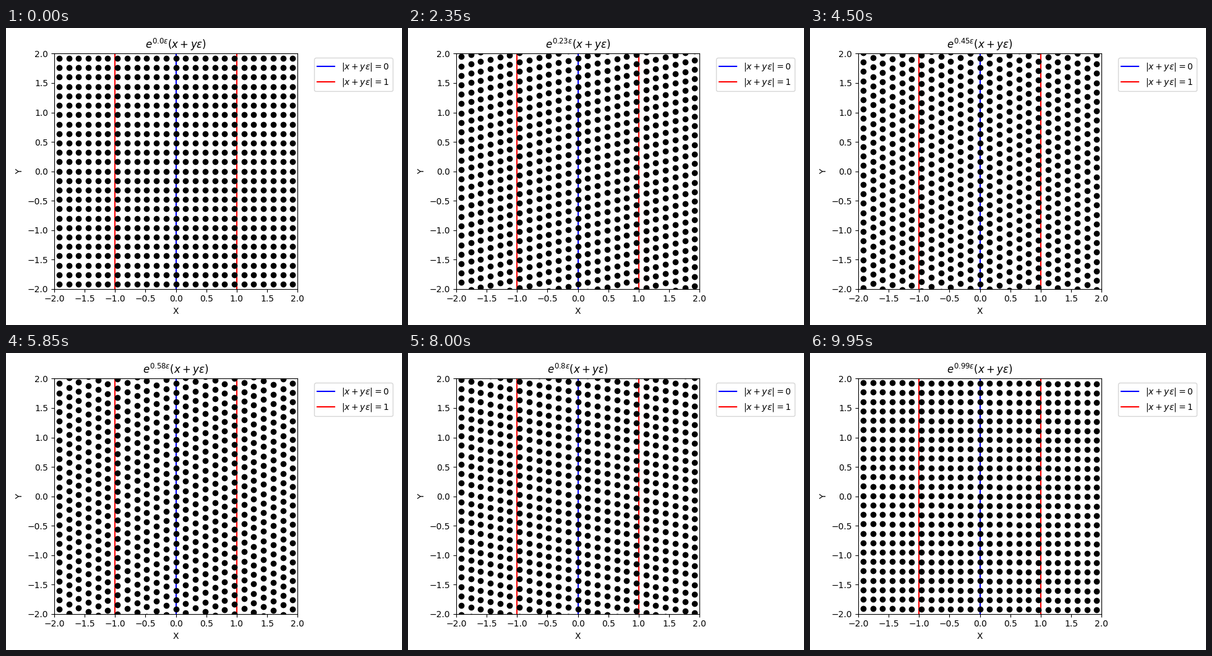
Recreate the animation shown at these times as a matplotlib script. Size 640x480 px, loop 10000 ms.

```python
import numpy as np
import matplotlib.pyplot as plt
from matplotlib.animation import FuncAnimation

FRAMES = 200
STEP = 0.16

plt.rcParams["font.family"] = "DejaVu Sans"

# Lattice of dual numbers x + y*eps, tall enough to fill the view when sheared
xs, ys = np.meshgrid(STEP * np.arange(-12, 13), STEP * np.arange(-25, 26))
xs, ys = xs.ravel(), ys.ravel()

fig, ax = plt.subplots(figsize=(6.4, 4.8), dpi=100)
ax.axvline(0, color="blue", label=r"$|x+y\varepsilon|=0$")
ax.axvline(-1, color="red", label=r"$|x+y\varepsilon|=1$")
ax.axvline(1, color="red")
dots, = ax.plot(xs, ys, "o", color="black", zorder=2.5)

ax.set(xlim=(-2, 2), ylim=(-2, 2), xlabel="X", ylabel="Y")
ax.set_xticks(np.arange(-2, 2.1, 0.5))
ax.set_yticks(np.arange(-2, 2.1, 0.5))
ax.legend(bbox_to_anchor=(1.05, 1), loc="upper left")


def update(i):
    angle = i / FRAMES
    dots.set_data(xs, ys + angle * xs)
    ax.set_title(rf"$e^{{{round(angle, 2)}\varepsilon}}(x+y\varepsilon)$")
    return dots,


update(0)
# The legend offset scales with the axes, so the layout needs a few passes
for _ in range(5):
    fig.tight_layout()

anim = FuncAnimation(fig, update, frames=FRAMES, interval=50,
                     repeat=True, repeat_delay=0)
plt.show()
```
